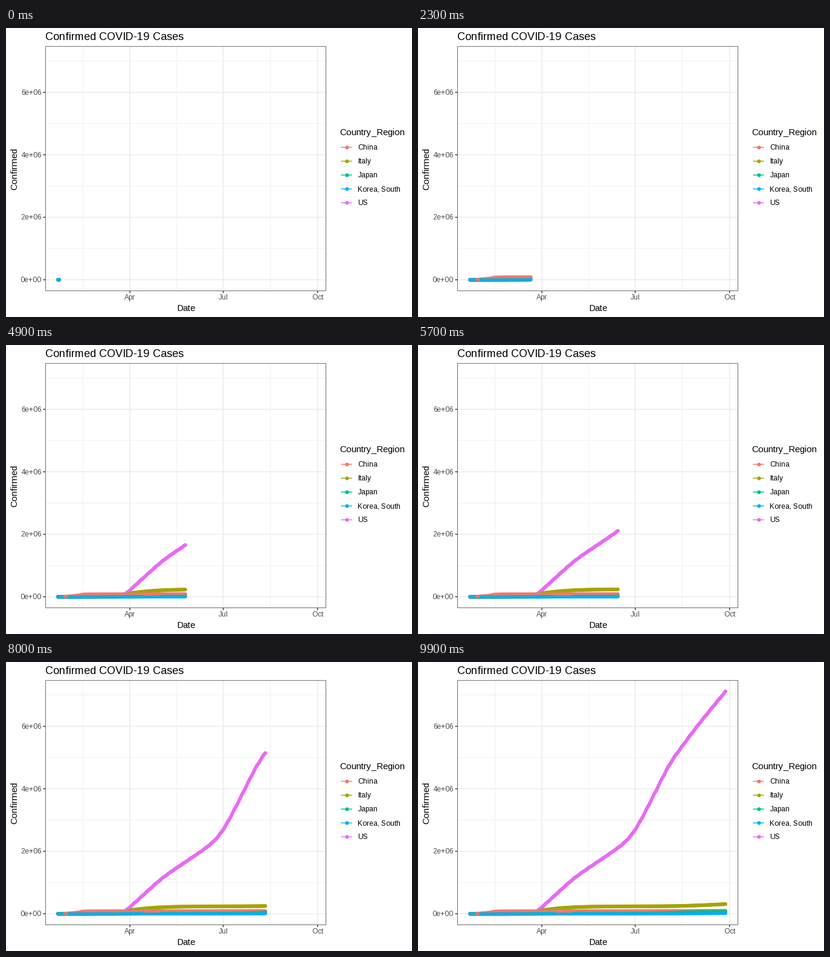
Write a matplotlib script that moves like this. It is 672 px wide and 480 px high and loops after 10 s.

```python
import numpy as np
import matplotlib.pyplot as plt
from matplotlib.animation import FuncAnimation
from matplotlib.patches import Rectangle

plt.rcParams["font.family"] = "Liberation Sans"
plt.rcParams["text.hinting"] = "force_autohint"
plt.rcParams["text.hinting_factor"] = 1   # whole-pixel glyph advances

W, H, DPI = 672, 480, 96
FRAMES, LAST = 100, 249          # LAST = days since Jan 22
PX = 72 / DPI                    # points per pixel
LEFT, RIGHT, TOP, BOTTOM = 65.1, 530.0, 30.4, 436.7
MAX = 7.115e6
GRID, DARK, GREY = "#EBEBEB", "#333333", "#4D4D4D"

COLORS = {"China": "#F8766D", "Italy": "#A3A500", "Japan": "#00BF7D",
          "Korea, South": "#00B0F6", "US": "#E76BF3"}
ORDER = ["Italy", "US", "China", "Japan", "Korea, South"]


def px(day):
    return LEFT + (RIGHT - LEFT) * (0.05 + day / LAST) / 1.1


def py(n):
    return BOTTOM - (BOTTOM - TOP) * (0.05 + n / MAX) / 1.1


def ramp(t, start, rate, width):
    """Growth that bends smoothly to a constant daily rate."""
    return rate * width * np.logaddexp(0, (t - start) / width)


def wave(t, mid, size, width):
    return size / (1 + np.exp(-(t - mid) / width))


def case_curves(t):
    """Cumulative cases per country, in thousands."""
    us = (ramp(t, 63, 30, 2) + ramp(t, 102, -8, 4) + ramp(t, 158, 44, 5)
          + ramp(t, 195, -22, 3) + ramp(t, 222, -4, 3))
    us += 0.17 * np.gradient(us) * np.sin(2 * np.pi * (t - 2) / 7)
    return {
        "US": us,
        "Italy": 240 * np.exp(-np.exp((65 - t) / 18.3)) + ramp(t, 208, 1.7, 12),
        "China": wave(t, 17.5, 67, 4.5) + 14 * (t >= 22) + 0.038 * t,
        "Japan": wave(t, 85, 17, 6) + wave(t, 200, 66, 13),
        "Korea, South": wave(t, 43, 11, 5) + ramp(t, 200, 0.25, 10),
    }


def layers(day):
    """Countries from bottom to top; China leads in two spells."""
    china_first = 7 <= day <= 10 or 84 <= day <= 100
    return sorted(ORDER, key=lambda c: c == "China") if china_first else ORDER


days = np.arange(LAST + 1)
cases = case_curves(days)
marks = [(d, c) for d in days for c in layers(d)]
xy = np.array([(px(d), py(1000 * cases[c][d])) for d, c in marks])

fig = plt.figure(figsize=(W / DPI, H / DPI), dpi=DPI, facecolor="white")
ax = fig.add_axes([0, 0, 1, 1])
ax.set_xlim(0, W)
ax.set_ylim(H, 0)
ax.axis("off")


def line(x0, y0, x1, y1, color, width, z):
    ax.plot([x0, x1], [y0, y1], color=color, lw=width * PX, zorder=z,
            snap=False, solid_capstyle="butt")


def label(x, y, s, size, color="black", **kw):
    ax.text(x, y, s, fontsize=size * PX, color=color, va="baseline",
            rotation_mode="anchor", **kw)


def dots(x, y, color, z):
    return ax.scatter(x, y, s=(6.2 * PX) ** 2, c=color, linewidths=0,
                      zorder=z, snap=False)


def vgrid(day, width):
    line(px(day), TOP, px(day), BOTTOM, GRID, width, 1)


def hgrid(n, width):
    line(LEFT, py(n), RIGHT, py(n), GRID, width, 1)


for d in (24.5, 115.5, 207):
    vgrid(d, 0.71)
for m in (1, 3, 5, 7):
    hgrid(m * 1e6, 0.71)

for d, name in ((70, "Apr"), (161, "Jul"), (253, "Oct")):
    x = px(d)
    vgrid(d, 1.42)
    line(x, BOTTOM, x, BOTTOM + 3.67, DARK, 1.42, 2)
    label(x, 451, name, 12, GREY, ha="center")

for m in (0, 2, 4, 6):
    y = py(m * 1e6)
    hgrid(m * 1e6, 1.42)
    line(LEFT - 3.67, y, LEFT, y, DARK, 1.42, 2)
    label(58, y + 4, f"{m * 1e6:.0e}", 12, GREY, ha="right")

edge = 0.355
ax.add_patch(Rectangle((LEFT + edge, TOP + edge), RIGHT - LEFT - 2 * edge,
                       BOTTOM - TOP - 2 * edge, fill=False, ec=DARK,
                       lw=2 * edge * PX, zorder=6, snap=False))

label(LEFT, 20, "Confirmed COVID-19 Cases", 18)
label((LEFT + RIGHT) / 2, 470, "Date", 15, ha="center")
label(18, (TOP + BOTTOM) / 2, "Confirmed", 15, ha="center", rotation=90)

label(552, 178, "Country_Region", 15)
for i, (name, color) in enumerate(COLORS.items()):
    y = 198.2 + 23.04 * i
    line(554.4, y, 572.8, y, color, 1.42, 3)
    dots([563.6], [y], color, 4)
    label(582.5, y + 4, name, 12)

trail = dots(xy[:, 0], xy[:, 1], [COLORS[c] for _, c in marks], 5)
shades = trail.get_facecolors().copy()


def update(i):
    day = min(LAST, int((i + 0.5) * LAST / (FRAMES - 1)))
    n = (day + 1) * len(ORDER)
    trail.set_offsets(xy[:n])
    trail.set_facecolors(shades[:n])
    return [trail]


anim = FuncAnimation(fig, update, frames=FRAMES, interval=100,
                     init_func=lambda: update(0), repeat=True, repeat_delay=0)
plt.show()
```
